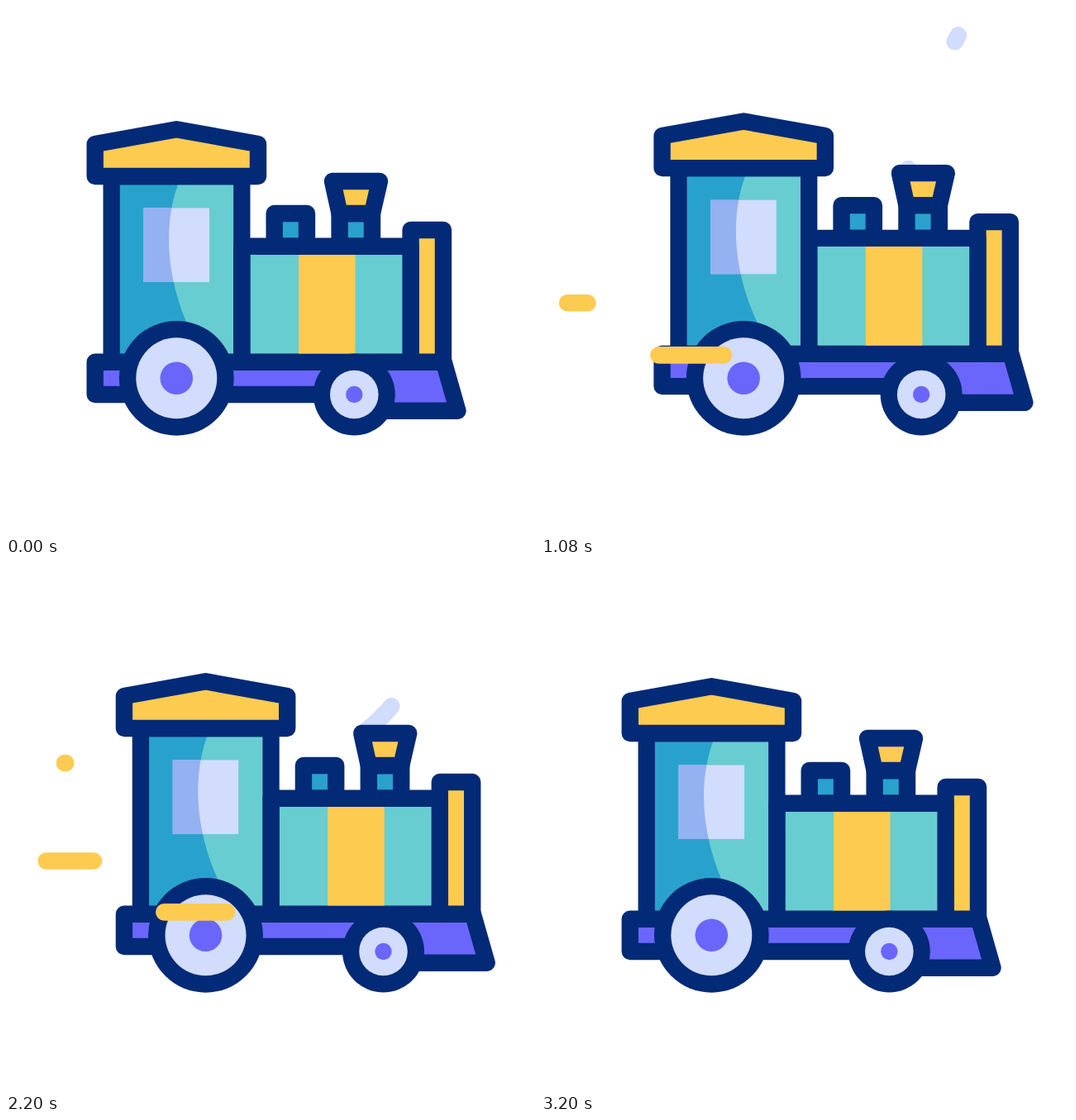
An HTML page that plays this animation: 640x640 px, repeating every 3.22 s.

```html
<!DOCTYPE html>
<html lang="en">
<head>
<meta charset="utf-8">
<title>Steam train</title>
<style>
  html, body { margin: 0; width: 100%; height: 100%; overflow: hidden; background: #fff; }
  svg { display: block; width: 100vw; height: 100vh; }
  .line { stroke: #032a76; stroke-width: 20.4; stroke-linejoin: round; }
  .navy { fill: #032a76; }
  .yellow { fill: #fdcb50; }
  .purple { fill: #6b66fb; }
  .teal { fill: #67cdd1; }
  .blue { fill: #28a2cd; }
  .light { fill: #d2dcfd; }
  .shade { fill: #94b1f2; }
  .smoke, .streak { fill: none; stroke-width: 20.6; stroke-linecap: round; }
  .smoke { stroke: #d2dcfd; }
  .streak { stroke: #fdcb50; }
</style>
</head>
<body>
<svg viewBox="0 0 640 640">
  <defs>
    <clipPath id="shadow"><path d="M120 200H212L208 216C192 260 192 320 218 382L240 430H120Z"/></clipPath>
  </defs>
  <g id="smoke"></g>
  <g id="body">
    <path class="line purple" d="M107.7 430.7H421V470H107.7Z"/>
    <path class="line purple" d="M421 430.7H529.7L546.5 489.7H421Z"/>
    <path class="line yellow" d="M489.6 271H529V430.7H489.6Z"/>
    <path class="line blue" d="M324.7 251H364V290.7H324.7ZM403.6 251H443V290.7H403.6Z"/>
    <path class="line yellow" d="M395 212H452L443 251H403.6Z"/>
    <path class="line teal" d="M285.3 290.7H489.6V430.7H285.3Z"/>
    <path class="yellow" d="M354 300.9H422.5V420.5H354Z"/>
    <path class="teal" d="M137.9 206H275.1V430H137.9Z"/>
    <path class="blue" clip-path="url(#shadow)" d="M137.9 206H275.1V430H137.9Z"/>
    <path class="light" d="M166.5 244.5H246V334H166.5Z"/>
    <path class="shade" clip-path="url(#shadow)" d="M166.5 244.5H246V334H166.5Z"/>
    <path class="line" fill="none" d="M127.7 206H285.3V430.7H127.7Z"/>
    <path class="line yellow" d="M107.7 206V167L206.3 149.3L305 167V206Z"/>
  </g>
  <g id="wheels">
    <circle class="navy" cx="206.3" cy="450.3" r="69.4"/>
    <circle class="light" cx="206.3" cy="450.3" r="49"/>
    <circle class="purple" cx="206.3" cy="450.3" r="19.8"/>
    <circle class="navy" cx="421.3" cy="470" r="49.5"/>
    <circle class="light" cx="421.3" cy="470" r="29.3"/>
    <circle class="purple" cx="421.3" cy="470" r="10.2"/>
  </g>
  <g id="streaks"></g>
</svg>
<script>
  const LOOP = 3220, TURN = 1600, TRAVEL = 51.6;

  // [time, height] steps
  const bobSteps = [[0, 0], [640, 12], [1130, -10.5], [1500, 0], [1780, 6],
                    [2200, -6], [2450, -7.5], [2780, -4], [3200, 0]];
  const upperDrift = [[0, 277], [800, 277], [1500, 267], [2200, 242]];

  const smokePaths = [
    "M398 207Q420 190 434 172C452 148 456 110 443 91C425 72 395 64 377 41Q370 32 371 18",
    "M442 207C430 188 414 165 414 127C414 113 417 104 421 95C430 74 456 62 466 39"
  ];
  const puffs = [[0, 25], [1, 409], [0, 1010], [1, 1415], [0, 2035], [1, 2440]];

  const streaks = [
    { from: 327, to: 71, span: 667, starts: [200, 1428], y: t => steps(upperDrift, t) },
    { from: 290, to: 32, span: 670, starts: [405, 1635], y: (t, bob) => 362.4 + 0.32 * bob },
    { from: 350, to: 19, span: 833, starts: [593, 1796], y: () => 422.4 }
  ];

  const ease = u => {
    u = Math.min(1, Math.max(0, u));
    return u * u * (3 - 2 * u);
  };

  function steps(table, t) {
    for (let i = 1; i < table.length; i++) {
      const [t0, a] = table[i - 1], [t1, b] = table[i];
      if (t <= t1) return a + (b - a) * ease((t - t0) / (t1 - t0));
    }
    return table[table.length - 1][1];
  }

  const byId = id => document.getElementById(id);

  function addPath(group, cls, d) {
    const path = document.createElementNS("http://www.w3.org/2000/svg", "path");
    path.setAttribute("class", cls);
    if (d) path.setAttribute("d", d);
    path.setAttribute("pathLength", 1);
    byId(group).append(path);
    return path;
  }

  const trails = puffs.map(([kind, start]) => ({
    path: addPath("smoke", "smoke", smokePaths[kind]), start, span: 600, lag: 150
  }));

  for (const s of streaks) {
    for (const start of s.starts) {
      trails.push({ path: addPath("streaks", "streak"), start, span: s.span, lag: 133, streak: s });
    }
  }

  // Shows the part of a path between its leading and trailing ends.
  function drawTrail({ path, start, span, lag, streak }, t, bob) {
    const age = t - start;
    const shown = age > 0 && age < span + lag;
    path.style.display = shown ? "" : "none";
    if (!shown) return;
    if (streak) {
      path.setAttribute("d", `M${streak.from} ${streak.y(t, bob)}H${streak.to}`);
    }
    const head = ease(age / span), tail = ease((age - lag) / span);
    path.setAttribute("stroke-dasharray", `${Math.max(0.001, head - tail)} 3`);
    path.setAttribute("stroke-dashoffset", -Math.min(tail, 0.998));
  }

  function draw(t) {
    const x = TRAVEL * ease(1 - Math.abs(t - TURN) / TURN);
    const bob = steps(bobSteps, t);
    byId("body").setAttribute("transform", `translate(${x} ${bob})`);
    byId("wheels").setAttribute("transform", `translate(${x} 0)`);
    byId("smoke").setAttribute("transform", `translate(${x} ${0.37 * bob})`);
    for (const trail of trails) drawTrail(trail, t, bob);
  }

  const begin = performance.now();
  function tick() {
    draw((performance.now() - begin) % LOOP);
    requestAnimationFrame(tick);
  }
  tick();
</script>
</body>
</html>
```
